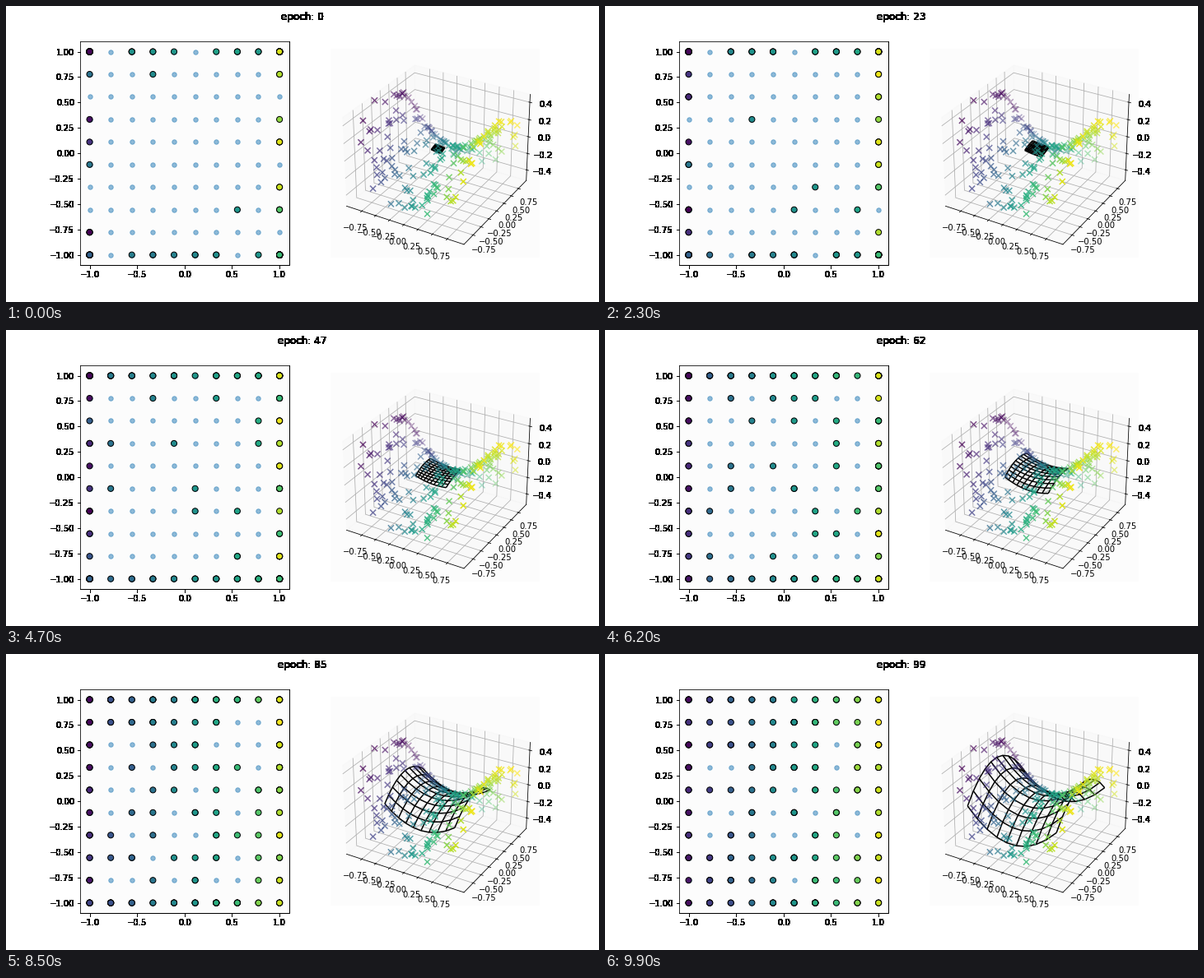
Recreate the animation shown at these times as a matplotlib script. Size 720x360 px, loop 10 s.

```python
import numpy as np
import matplotlib.pyplot as plt
from matplotlib.animation import FuncAnimation

EPOCHS, NODES, SAMPLES = 100, 10, 200

plt.rcParams.update({
    "font.family": "DejaVu Sans",
    "font.size": 10,
    "figure.subplot.bottom": 0.125,
    "axes.facecolor": "#fcfcfc",
})


def saddle(x, y):
    return (x**2 - y**2) / 2


def harden(img, dpi):
    """Turn soft glyph edges into solid black."""
    out = np.zeros_like(img)
    out[..., 3] = img[..., 3] > 0
    return out, 0, 0


# Samples on the saddle and the lattice that learns it
rng = np.random.default_rng(7)
px, py = rng.uniform(-0.99, 0.99, (2, SAMPLES))
data = np.column_stack([px, py, saddle(px, py)])

axis = np.linspace(-1, 1, NODES)
gu, gv = np.meshgrid(axis, axis, indexing="ij")
slots = np.column_stack([gu.ravel(), gv.ravel()])


def lattice(epoch):
    """Node positions: a growing sheet, skewed early and curved late."""
    p = epoch / (EPOCHS - 1)
    size = 0.077 * np.exp(2.5 * p - 0.2 * p**4)
    skew = 0.35 * (1 - p**3)
    bend = 0.2 + 0.8 * p**1.5
    scale = size * (1 + skew * (1 - gu * gv) / 2)
    x, y = gu * scale, gv * scale
    return x, y, bend * saddle(x, y)


def winners(x, y, z):
    """Index of the closest node for every sample."""
    nodes = np.column_stack([x.ravel(), y.ravel(), z.ravel()])
    dist = ((data[:, None] - nodes[None]) ** 2).sum(axis=2)
    return dist.argmin(axis=1)


def fix_limits():
    ax3.set(xlim=(-1.03, 1.03), ylim=(-1.03, 1.03), zlim=(-0.53, 0.49))


fig = plt.figure(figsize=(10, 5), dpi=72, facecolor="white")
title = fig.suptitle("epoch: 0", fontsize=12)
title.set_agg_filter(harden)

# Node map
ax = fig.add_subplot(1, 2, 1)
ax.scatter(*slots.T, s=30, alpha=0.5)
hits = ax.scatter(px, py, c=px, s=50, edgecolors="black", linewidths=1)
ax.set(xlim=(-1.1, 1.1), ylim=(-1.1, 1.1),
       xticks=np.arange(-1, 1.1, 0.5), yticks=np.arange(-1, 1.1, 0.25))
ax.spines[["right", "bottom"]].set_linewidth(1)
for side in (ax.xaxis, ax.yaxis):
    side.set_agg_filter(harden)

# Sample cloud and sheet
ax3 = fig.add_subplot(1, 2, 2, projection="3d")
ax3.scatter(*data.T, c=px, marker="x", s=50)
ticks = np.arange(-0.75, 0.8, 0.25)
ax3.set(xticks=ticks, yticks=ticks, zticks=np.arange(-2, 3) * 0.2)
fix_limits()
for side in (ax3.xaxis, ax3.yaxis, ax3.zaxis):
    side.set_pane_color((0.95, 0.95, 0.95, 0.25))
for tick in ax3.zaxis.get_major_ticks():
    tick.label1.set_agg_filter(harden)

sheet = None


def update(epoch):
    global sheet
    if sheet is not None:
        sheet.remove()
    x, y, z = lattice(epoch)
    sheet = ax3.plot_wireframe(x, y, z, color="black", rstride=1, cstride=1)
    fix_limits()
    hits.set_offsets(slots[winners(x, y, z)])
    title.set_text(f"epoch: {epoch}")
    return sheet, hits, title


anim = FuncAnimation(fig, update, frames=EPOCHS, init_func=lambda: update(0),
                     interval=100, repeat=True, repeat_delay=0, blit=False)
plt.show()
```
